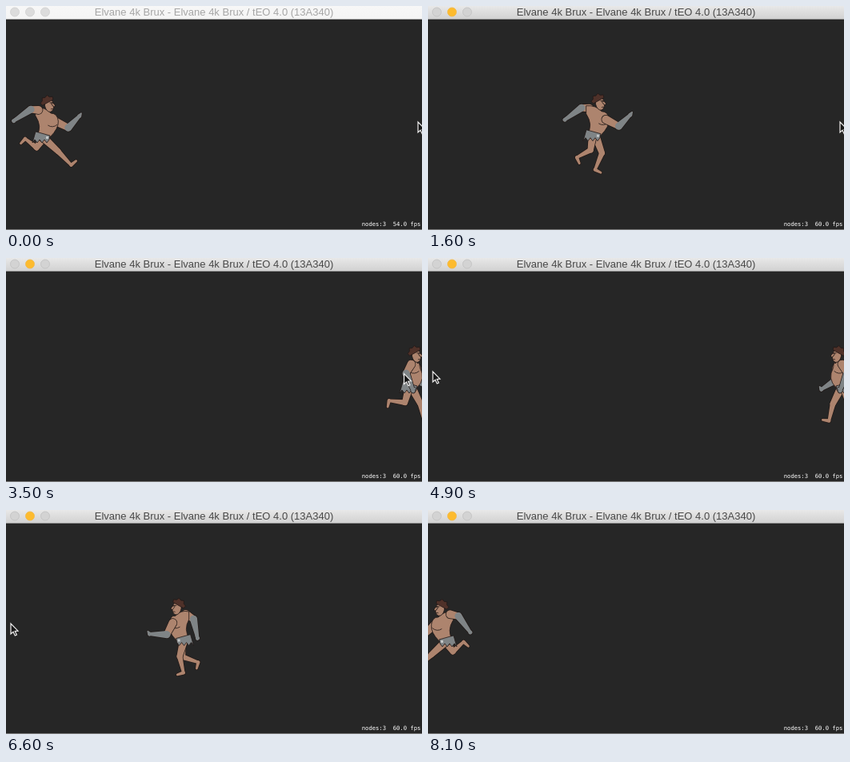
An HTML page with a canvas for the animation above (9600 ms loop, 520 px wide and 280 px high).

```html
<!DOCTYPE html>
<html lang="en">
<head>
<meta charset="utf-8">
<title>Runner</title>
<style>
html, body { margin: 0; width: 100%; height: 100%; overflow: hidden; background: #262626; }
canvas { display: block; }
</style>
</head>
<body>
<canvas id="stage" width="520" height="280"></canvas>
<script>
const ctx = document.getElementById('stage').getContext('2d');
const SKIN = '#ad846e', GREY = '#7f8486', INK = '#211917', HAIR = '#4f3129';
const LOOP = 9600, STEP = 100, CYCLE = 400, TAU = Math.PI * 2;
const RIGHT = { start: 635, time: 2752, from: 53, to: 512, dir: 1 };
const LEFT = { start: 4900, time: 2835, from: 512, to: 16, dir: -1 };
const lerp = (a, b, k) => a + (b - a) * k;
const clamp = k => Math.min(1, Math.max(0, k));
const wave = p => Math.cos(TAU * p);

// A point at a distance and an angle in degrees: 0 is down, positive is forward
function from([x, y], len, deg) {
  const a = deg * TAU / 360;
  return [x + len * Math.sin(a), y + len * Math.cos(a)];
}

function legJoints(hip, p) {
  const c = wave(p), shin = -42 + 90 * wave(p - 0.05);
  const knee = from(hip, 22 + 5 * c, 6 + 42 * wave(p - 0.03));
  const ankle = from(knee, 21 + 3 * c, shin);
  return [hip, knee, ankle, from(ankle, 8, shin + 85)];
}

function armJoints(p) {
  const s = wave(p - 0.42), reach = Math.tanh(2 * s);
  const shoulder = [-2 + 11 * reach, 15 + 7.5 * reach];
  const elbow = from(shoulder, 14 + 5 * s, -15 + 90 * s);
  return [shoulder, elbow, from(elbow, 23 - 3 * s, 40 + 110 * s)];
}

function paint(fill, width = 0.8) {
  ctx.fillStyle = fill;
  ctx.fill();
  ctx.strokeStyle = INK;
  ctx.lineWidth = width;
  ctx.stroke();
}

function shape(points, fill) {
  ctx.beginPath();
  points.forEach(p => ctx.lineTo(...p));
  ctx.closePath();
  paint(fill);
}

function mark(x1, y1, cx, cy, x2, y2) {
  ctx.beginPath();
  ctx.moveTo(x1, y1);
  ctx.quadraticCurveTo(cx, cy, x2, y2);
  ctx.strokeStyle = INK;
  ctx.lineWidth = 0.8;
  ctx.stroke();
}

function taper([x1, y1], r1, [x2, y2], r2) {
  const a = Math.atan2(y2 - y1, x2 - x1), q = TAU / 4;
  ctx.beginPath();
  ctx.arc(x1, y1, r1, a + q, a - q);
  ctx.arc(x2, y2, r2, a - q, a + q);
  ctx.closePath();
}

// Segments: [from, radius, to, radius, colour]; all outlines go under all fills
function limb(...segs) {
  ctx.strokeStyle = INK;
  ctx.lineWidth = 1.5;
  for (const s of segs) { taper(...s); ctx.stroke(); }
  for (const s of segs) { taper(...s); ctx.fillStyle = s[4]; ctx.fill(); }
}

function arm([shoulder, elbow, hand]) {
  const tip = [hand[0] + 2, hand[1] - 3];
  limb([shoulder, 5, elbow, 4, SKIN], [elbow, 4.6, hand, 2, GREY], [hand, 2.6, tip, 1, GREY]);
}

function leg([hip, knee, ankle, toe]) {
  limb([hip, 5.2, knee, 3.6, SKIN], [knee, 3.4, ankle, 1.7, SKIN], [ankle, 2.2, toe, 1.4, SKIN]);
}

function torso(s1, s2, [hx, hy]) {
  const [[bx, by], [fx, fy]] = s1[0] < s2[0] ? [s1, s2] : [s2, s1];
  ctx.beginPath();
  ctx.moveTo(bx - 4, by - 3);
  ctx.quadraticCurveTo(-4, 4, 3, 12);
  ctx.quadraticCurveTo(fx + 3, fy - 10, fx + 4, fy);
  ctx.quadraticCurveTo(hx + 21, hy - 10, hx + 10, hy + 1);
  ctx.lineTo(hx - 7, hy);
  ctx.quadraticCurveTo(hx + 1, hy - 12, bx - 4, by + 7);
  ctx.closePath();
  paint(SKIN);
  mark(fx - 9, fy + 5, fx - 3, fy + 9, fx + 3, fy + 4);
}

function cloth([x, y]) {
  const hem = Array.from({ length: 8 }, (_, i) => [x + 9 - 3 * i, y + (i % 2 ? 8 : 4)]);
  shape([[x - 8, y - 6], [x + 10, y - 1], ...hem], GREY);
  ctx.fillStyle = '#c4c7c8';
  ctx.fillRect(x + 5, y, 3, 3);
}

function head() {
  ctx.beginPath();
  ctx.ellipse(1, 2, 5.5, 8.5, -0.2, 0, TAU);
  paint(SKIN);
  limb([[5, 0], 1, [7, 2.5], 1, SKIN]);
  const tufts = Array.from({ length: 9 }, (_, i) => {
    const a = TAU * (0.43 + 0.06 * i), r = i % 2 ? 9.5 : 7.5;
    return [r * Math.cos(a) - 0.5, r * Math.sin(a) - 1];
  });
  shape(tufts, HAIR);
  mark(1.5, -1, 4, -2, 6, 0);
  mark(3, 7, 4, 6, 6, 7);
}

function runner(x, dir, p) {
  const hip = [-8, 41], near = armJoints(p), far = armJoints(p + 0.5);
  ctx.save();
  ctx.translate(x, 120.5 + 1.5 * wave(p));
  ctx.scale(dir, 1);
  arm(far);
  leg(legJoints([hip[0] + 3, hip[1]], p + 0.5));
  leg(legJoints(hip, p));
  torso(near[0], far[0], hip);
  cloth(hip);
  head();
  arm(near);
  ctx.restore();
}

// The stride lingers on the push-off and hurries through the swing
function stride(ms) {
  const u = ms / CYCLE;
  return u - 0.12 * (1 + wave(u - 0.72));
}

function drawRunner(t) {
  const run = t > LEFT.start ? LEFT : RIGHT;
  const ms = Math.min(run.time, Math.max(0, t - run.start));
  const dir = t < LEFT.start ? RIGHT.dir : LEFT.dir;
  runner(lerp(run.from, run.to, ms / run.time), dir, ms ? stride(ms) : 0);
}

function drawCursor(t) {
  if (t >= 8100) return;
  const k = clamp((t - 3400) / 900), out = clamp((t - 7800) / 200);
  const x = lerp(515, 6, k * k * (3 - 2 * k)) + 162 * Math.sqrt(out);
  const y = lerp(145, 142, k) - 88 * out ** 3;
  shape([[0, 0], [0, 13], [3, 10.3], [5.3, 15], [7.4, 14], [5.2, 9.5], [9, 9.2]]
    .map(([dx, dy]) => [x + dx, y + dy]), '#161616');
  ctx.strokeStyle = '#f0f0f0';
  ctx.lineWidth = 1.2;
  ctx.stroke();
}

function drawWindow(t) {
  const active = t >= 500;
  ctx.fillStyle = '#262626';
  ctx.fillRect(0, 0, 520, 280);
  ctx.fillStyle = '#777';
  ctx.fillRect(0, 279, 520, 1);
  const bar = ctx.createLinearGradient(0, 0, 0, 17);
  bar.addColorStop(0, active ? '#e8e8e8' : '#f7f7f7');
  bar.addColorStop(1, active ? '#d0d0d0' : '#f4f4f4');
  ctx.fillStyle = bar;
  ctx.fillRect(0, 0, 520, 16.6);
  for (let i = 0; i < 3; i++) {
    const lit = active && i === 1;
    ctx.beginPath();
    ctx.arc(11 + 19 * i, 7.5, 5.5, 0, TAU);
    ctx.fillStyle = lit ? '#fdbb2e' : active ? '#d3d3d3' : '#dcdcdc';
    ctx.fill();
    ctx.strokeStyle = lit ? '#f0b84a' : active ? '#c0c0c0' : '#d0d0d0';
    ctx.lineWidth = 0.8;
    ctx.stroke();
  }
  ctx.font = '13px "Liberation Sans", Arial, sans-serif';
  ctx.textAlign = 'center';
  ctx.fillStyle = active ? '#484848' : '#a6a6a6';
  ctx.fillText('Elvane 4k Brux - Elvane 4k Brux / tEO 4.0 (13A340)', 260, 12);
}

function drawStats(t) {
  ctx.font = '7.2px "DejaVu Sans Mono", monospace';
  ctx.textAlign = 'right';
  ctx.fillStyle = '#fff';
  ctx.fillText(`nodes:3  ${t < 200 ? '54.0' : '60.0'} fps`, 518.3, 275);
}

function frame(now) {
  const t = Math.floor(now % LOOP / STEP) * STEP;
  drawWindow(t);
  drawRunner(t);
  drawStats(t);
  drawCursor(t);
  requestAnimationFrame(frame);
}
requestAnimationFrame(frame);
</script>
</body>
</html>
```
